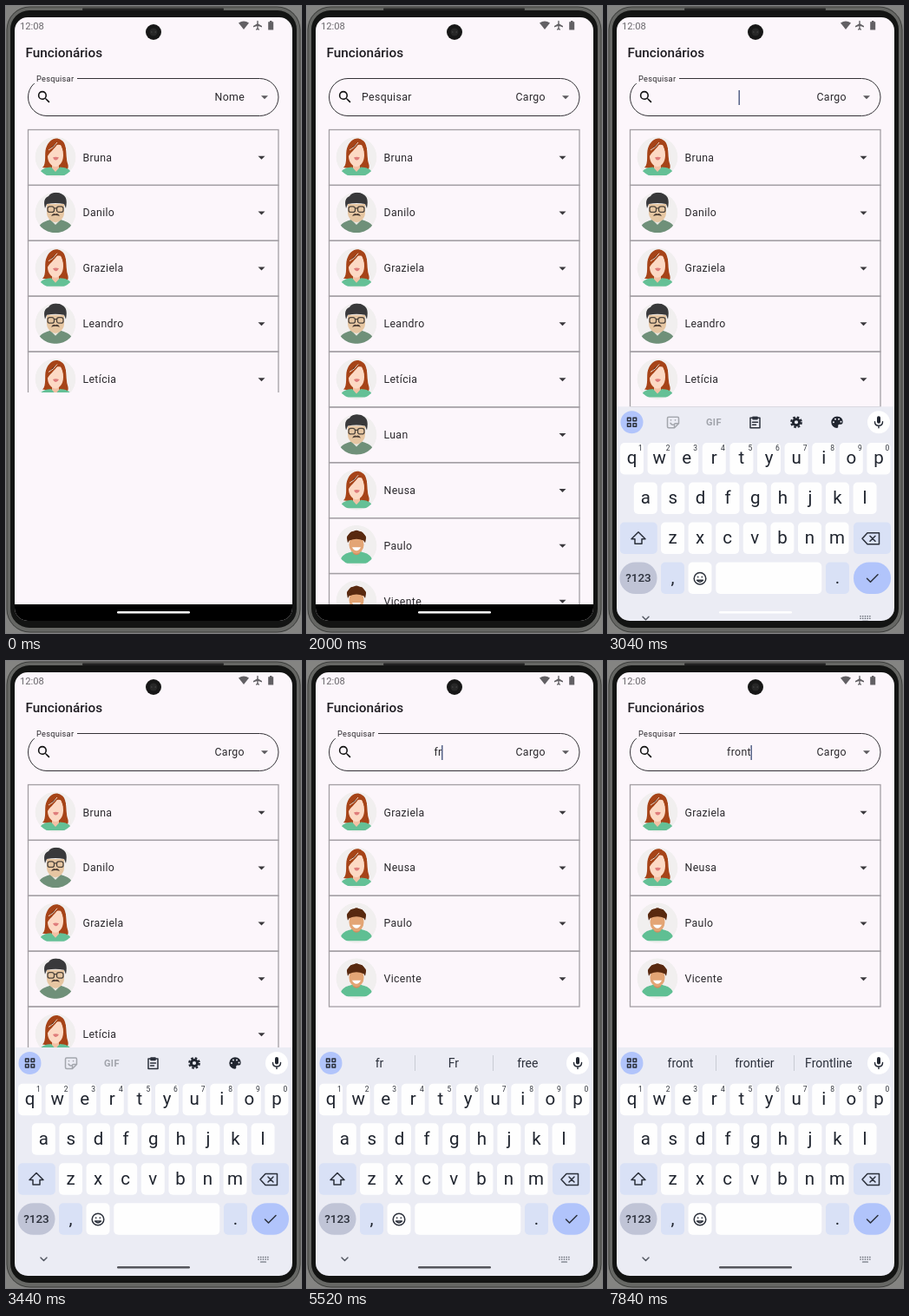
Recreate the animation shown at these times as an HTML page. Size 340 px wide and 722 px high, loop 8 s.

```html
<!DOCTYPE html>
<html lang="pt">
<head>
<meta charset="utf-8">
<title>Lista de funcionários</title>
<style>
html, body { margin: 0; width: 100%; height: 100%; overflow: hidden; background: #848482; }
svg { display: block; width: 340px; height: 722px; font-family: Roboto, "Noto Sans", sans-serif; }
.body { font-size: 12.3px; letter-spacing: .36px; fill: #2a282c; }
.mid { text-anchor: middle; }
.key { font-size: 20.5px; fill: #20252f; }
.hint { font-size: 8.5px; fill: #30343d; }
.line { fill: none; stroke: #2b303b; stroke-width: 1.5; stroke-linecap: round; stroke-linejoin: round; }
.label, .gap, .menu, .items, .board, .pill, .caret {
  animation: 8s linear infinite;
}
.label { animation-name: label; }
.gap { animation-name: gap; transform-origin: 57px 0; }
.menu { animation-name: menu; transform-origin: 326px 80px; }
.items { animation-name: items; }
.board { animation-name: board; }
.pill { animation-name: pill; }
.caret { animation-name: blink; animation-timing-function: step-end; }
@keyframes label {
  0%, 2%, 34.5%, 100% { transform: translate(35px, 87px) scale(.75); animation-timing-function: ease-in-out; }
  5%, 32% { transform: translate(63px, 109px) scale(1); animation-timing-function: ease-in-out; }
}
@keyframes gap {
  0%, 2%, 34.5%, 100% { transform: scaleX(1); }
  5%, 32% { transform: scaleX(0); }
}
@keyframes menu {
  0%, 6% { opacity: 0; transform: scale(.4, .1); animation-timing-function: ease-out; }
  7.5% { opacity: 1; }
  10.5%, 18.5% { opacity: 1; transform: none; }
  22.5%, 100% { opacity: 0; transform: none; }
}
@keyframes items {
  0%, 7.5% { opacity: 0; }
  11%, 100% { opacity: 1; }
}
@keyframes board {
  0%, 33% { transform: translateY(265px); animation-timing-function: cubic-bezier(.165, .84, .44, 1); }
  42%, 100% { transform: none; }
}
@keyframes pill {
  0%, 41% { fill: #fff; }
  43%, 100% { fill: #55565c; }
}
@keyframes blink {
  0% { opacity: 0; }
  33% { opacity: 1; }
  39.25% { opacity: 0; }
  45.5% { opacity: 1; }
  51.75% { opacity: 0; }
  56% { opacity: 1; }
  62.25% { opacity: 0; }
  66% { opacity: 1; }
  91.25% { opacity: 0; }
  97%, 100% { opacity: 1; }
}
</style>
</head>
<body>
<svg viewBox="0 0 340 722">
  <defs>
    <clipPath id="screen"><rect x="10" y="13" width="320" height="695" rx="15"/></clipPath>
    <clipPath id="disc"><circle r="23.5"/></clipPath>
    <filter id="shadow" x="-20%" y="-20%" width="140%" height="140%">
      <feDropShadow dx="0" dy="2" stdDeviation="3.6" flood-opacity=".42"/>
    </filter>

    <g id="woman" clip-path="url(#disc)">
      <circle r="23.5" fill="#f1efef"/>
      <path fill="#a64418" d="M-15 12C-10 8-13-4-11-10-8-20 0-24 6-20 13-17 12-6 13 2 13 7 16 9 14 14L8 13H-8z"/>
      <path fill="#f3c0a4" d="M-4 6H4V14L0 18-4 14z"/>
      <path fill="#64c096" d="M-19 21C-18 13-10 12-5 11.5L0 17 5 11.5C11 12 18 13 19 21z"/>
      <path fill="#fcd9c4" d="M-8-7Q-2-16 6-14 9-10 9-2C9 6 4 11 0 11-5 11-9 5-9-1z"/>
      <path fill="#a64418" d="M-10 1C-8-5-1-9 3-16L6-15C8-11 8-8 11-2L12-10 4-20-6-17-11-9z"/>
      <path stroke="#f6dccb" stroke-width="1" d="M-8-8Q-2-11 2-17"/>
      <path fill="#df7d7c" d="M-3 .5Q0-1 4 .5 2 4 0 3.5-2 3-3 .5z"/>
    </g>

    <g id="man" clip-path="url(#disc)">
      <circle r="23.5" fill="#f1efef"/>
      <path fill="#6f9079" d="M-21 23C-20 11-11 10-6 8H6C11 10 20 11 21 23z"/>
      <path fill="#e7e6df" d="M-6 8 0 14 6 8 5 5H-5z"/>
      <path fill="#e6c6a2" d="M-10-10H10V0C10 7 4 11 0 11S-10 7-10 0z"/>
      <path fill="#39393b" d="M-12-5C-14-12-13-17-8-19-5-24 4-24 8-21 14-18 13-11 12-5L10-10Q0-12-10-10z"/>
      <g fill="none" stroke="#4d443c" stroke-width="1.3">
        <rect x="-9" y="-7" width="7.5" height="6.5" rx="2.5"/>
        <rect x="1.5" y="-7" width="7.5" height="6.5" rx="2.5"/>
        <path d="M-1.5-5h3"/>
      </g>
      <path fill="#4a3c34" d="M-5 4Q-3 0 0 1.5 3 0 5 4 2 3 0 3-2 3-5 4z"/>
    </g>

    <g id="boy" clip-path="url(#disc)">
      <circle r="23.5" fill="#f1efef"/>
      <path fill="#5fbf93" d="M-19 20.5C-18 9-10 9-5 7H5C10 9 18 9 19 20.5z"/>
      <path fill="#cf8d5f" d="M-4 4H4V9Q0 13-4 9z"/>
      <ellipse cy="-1" rx="8.5" ry="10.5" fill="#e3a575"/>
      <g fill="#58290f">
        <path d="M-10-3C-13-12-7-17 0-17S13-12 10-3L8-6Q0-9-8-6z"/>
        <circle cx="-8" cy="-9" r="3"/><circle cx="-4.500" cy="-13" r="3"/>
        <circle cy="-14.500" r="3"/><circle cx="4.500" cy="-13" r="3"/><circle cx="8" cy="-9" r="3"/>
      </g>
      <path fill="#fff" d="M-5 2H5Q3 6 0 6-3 6-5 2z"/>
    </g>
  </defs>

  <rect width="340" height="722" fill="#848482"/>
  <rect x=".5" y=".5" width="339" height="721" rx="27" fill="#3c3d3b"/>
  <rect x="1.500" y="1.500" width="337" height="719" rx="26" fill="#666764"/>
  <rect x="5" y="5" width="330" height="711" rx="22" fill="#131413"/>
  <rect x="88" y="2.500" width="163" height="2.500" rx="1" fill="#222"/>

  <g clip-path="url(#screen)">
    <rect width="340" height="722" fill="#fcf6fb"/>
    <text x="16" y="27" font-size="11.2" fill="#6b696d">12:08</text>
    <g fill="#626064">
      <path d="M268 19.500Q274 15.500 280 19.500L274 27z"/>
      <path d="M289.300 17.500q.7-1.500 1.400 0v3l4.300 2.500v1.400l-4.300-1.300v2.700l1.300 1v1l-2-.6-2 .6v-1l1.300-1v-2.700l-4.300 1.300v-1.400l4.300-2.500z"/>
      <path d="M304 17h2.500v1.200h1.700v9.300h-6v-9.300h1.800z"/>
    </g>
    <text x="22.500" y="59.400" font-size="15.300" font-weight="500" fill="#1d1b20">Funcionários</text>

    <rect x="25.500" y="83.500" width="288.500" height="43" rx="21.500" fill="none" stroke="#333136"/>
    <rect class="gap" x="32" y="82" width="50" height="7" fill="#fcf6fb"/>
    <text class="body label">Pesquisar</text>
    <path transform="translate(34.500 95.500) scale(.78)" fill="#111" d="M15.500 14h-.79l-.28-.27A6.470 6.470 0 0 0 16 9.500 6.500 6.500 0 1 0 9.500 16c1.610 0 3.090-.59 4.230-1.570l.27.28v.79l5 4.990L20.490 19zm-6 0a4.500 4.500 0 1 1 0-9 4.500 4.500 0 0 1 0 9z"/>
    <text id="byName" class="body" x="240.500" y="109">Nome</text>
    <text id="byRole" class="body" x="240.500" y="109">Cargo</text>
    <path d="M294 103.200h8l-4 4z" fill="#5b595d"/>
    <g id="typed"></g>

    <g id="all"></g>
    <g id="found"></g>
    <rect id="mask" x="10" y="445" width="320" height="244" fill="#fcf6fb"/>
    <rect x="10" y="689" width="320" height="20" fill="#000"/>

    <g class="board">
      <rect x="10" y="445" width="320" height="270" fill="#ebecf4"/>
      <g id="tools">
        <g class="line" style="stroke:#a3a6ad">
          <path d="M70 457h10q1.500 0 1.500 1.500v6l-5 5H70q-1.500 0-1.500-1.500v-9.500q0-1.500 1.500-1.500zM76.500 469v-3.500q0-1 1-1h3.500M72 464q2 3 4 1.500M72.500 460.500v.3M77.500 460.500v.3"/>
        </g>
        <text class="mid" x="122" y="467" font-size="11" font-weight="700" letter-spacing=".5" fill="#a0a3aa">GIF</text>
        <path class="line" d="M164 458h11v11.500h-11zM167 457h5v2.500h-5zM166.500 463h6M166.500 466h4"/>
        <circle cx="217" cy="463" r="3.600" fill="none" stroke="#20252f" stroke-width="3"/>
        <circle cx="217" cy="463" r="5.800" fill="none" stroke="#20252f" stroke-width="2.200" stroke-dasharray="2.600 1.960"/>
        <path fill="#20252f" d="M264 456.300a6.700 6.700 0 1 0 0 13.400q1.800-.3 1.200-2.200-.3-2 1.500-2h2q2-.3 2-3-.5-6-6.700-6.200z"/>
        <g fill="#ebecf4"><circle cx="260" cy="463" r="1"/><circle cx="262" cy="459.500" r="1"/><circle cx="266" cy="459.500" r="1"/><circle cx="268.500" cy="462.500" r="1"/></g>
      </g>
      <g id="hints"><path d="M124.500 454v18M214.500 454v18" stroke="#c9ccd4"/></g>
      <circle cx="27.500" cy="463" r="13" fill="#b1c4fb"/>
      <path class="line" d="M22.500 458h3.600v3.600h-3.600zM29 458h3.600v3.600H29zM22.500 464.500h3.600v3.600h-3.600zM29 464.500h3.600v3.600H29z"/>
      <circle cx="312" cy="463" r="13" fill="#fff"/>
      <rect x="310" y="456" width="4" height="8.500" rx="2" fill="#20252f"/>
      <path class="line" d="M307.500 462.500q0 4.500 4.500 4.500t4.500-4.500M312 467v2.500"/>
      <g id="keys"></g>
      <g class="line">
        <path d="M35 589.500l-8 8h4v5.500h8v-5.500h4z"/>
        <path d="M299 590.500h13.500v13H299l-6-6.500zM302 594l6 6M308 594l-6 6"/>
        <circle cx="106" cy="643" r="6.800"/>
        <path d="M103.700 641v.4M108.300 641v.4M102.500 645q3.500 3.800 7 0z"/>
        <path d="M298.500 643l4 4 8.500-8.500"/>
        <path d="M40 687l3.500 3.500 3.500-3.500" style="stroke:#555a64"/>
        <path d="M291 686.500h11M291 689h11" style="stroke:#555a64;stroke-dasharray:.1 2.600"/>
        <path d="M293.500 692h6" style="stroke:#555a64;stroke-width:1.200"/>
      </g>
    </g>
    <rect class="pill" x="128" y="697" width="84" height="2.600" rx="1.300"/>

    <g class="menu">
      <rect x="228" y="80" width="98" height="125" rx="3" fill="#fcf6fb" filter="url(#shadow)"/>
      <g class="items body">
        <text x="240.500" y="109">Nome</text>
        <text x="240.500" y="146.500">Cargo</text>
        <text x="240.500" y="184">Telefone</text>
      </g>
    </g>
  </g>

  <circle cx="170" cy="30" r="9" fill="#171717"/>
  <circle cx="170" cy="30" r="4.500" fill="#272727"/>
  <path d="M167 30h1.500M171.500 30h1.500" stroke="#4a4a4a"/>
</svg>
<script>
const LOOP = 8000;
const $ = id => document.getElementById(id);

// Visible from one time to another within the loop.
function show(el, from, to) {
  const frame = (opacity, ms) => ({ opacity, offset: ms / LOOP, easing: 'step-end' });
  const frames = [frame(1, from)];
  if (from > 0) frames.unshift(frame(0, 0));
  if (to < LOOP) frames.push(frame(0, to));
  frames.push(frame(to < LOOP ? 0 : 1, LOOP));
  el.animate(frames, { duration: LOOP, iterations: Infinity });
}

const people = [
  ['Bruna', 'woman'], ['Danilo', 'man'], ['Graziela', 'woman'],
  ['Leandro', 'man'], ['Letícia', 'woman'], ['Luan', 'man'],
  ['Neusa', 'woman'], ['Paulo', 'boy'], ['Vicente', 'boy']
];

function list(rows) {
  const pitch = 63.88;
  return rows.map(([name, face], i) => `
    <g transform="translate(0 ${142.5 + i * pitch})">
      <rect x="25.500" width="288.500" height="${pitch}" fill="none" stroke="#a39fa4" stroke-width="1.300"/>
      <use href="#${face}" x="57" y="31.500"/>
      <text class="body" x="88.500" y="36">${name}</text>
      <path d="M290.500 30.200h8l-4 4z" fill="#3a383c"/>
    </g>`).join('');
}
$('all').innerHTML = list(people);
$('found').innerHTML = list([2, 6, 7, 8].map(i => people[i]));

function key(x, y, w, fill, label = '', rx = 5) {
  return `<rect x="${x - w / 2}" y="${y - 18.3}" width="${w}" height="36.600" rx="${rx}" fill="${fill}"/>
    <text class="key mid" x="${x}" y="${y + 6}">${label}</text>`;
}
const step = 31.6, soft = '#d9e1f6', white = '#fefefe';
const rows = [['qwertyuiop', 27.5, 505], ['asdfghjkl', 43.3, 550.5], ['zxcvbnm', 74.5, 596.5]];
let keys = '';
for (const [letters, x, y] of rows)
  [...letters].forEach((c, i) => keys += key(x + i * step, y, 27, white, c));
for (let i = 0; i < 10; i++)
  keys += `<text class="hint mid" x="${37.5 + i * step}" y="496">${(i + 1) % 10}</text>`;
keys += key(35.3, 596.5, 43, soft) + key(304.5, 596.5, 43, soft)
  + key(35, 642.5, 43, '#c0c4d6', '', 18) + key(74.5, 642.5, 27, soft, ',')
  + key(106, 642.5, 27, white) + key(185.3, 642.5, 122, white)
  + key(264.5, 642.5, 27, soft, '.') + key(304.5, 642.5, 43, '#b1c4fb', '', 18)
  + '<text class="mid" x="35" y="647" font-size="13.500" font-weight="500" fill="#2b303b">?123</text>';
$('keys').innerHTML = keys;

// Start time, typed text, suggestions
const typing = [
  [2640, '', []],
  [4480, 'f', ['f', 'F', 'for']],
  [5280, 'fr', ['fr', 'Fr', 'free']],
  [5760, 'fro', ['fro', 'from', 'front']],
  [6240, 'fron', ['fron', 'front', 'frontier']],
  [6800, 'front', ['front', 'frontier', 'Frontline']]
];
function group(parent, html) {
  const g = document.createElementNS('http://www.w3.org/2000/svg', 'g');
  g.innerHTML = html;
  return parent.appendChild(g);
}
typing.forEach(([from, word, tips], i) => {
  const to = i + 1 < typing.length ? typing[i + 1][0] : LOOP;
  const field = group($('typed'), `<text class="body mid" x="151" y="109">${word}</text>
    <rect class="caret" y="97" width="1.400" height="17" fill="#48577f"/>`);
  const width = field.querySelector('text').getComputedTextLength();
  field.querySelector('rect').setAttribute('x', 150.5 + width / 2);
  show(field, from, to);
  show(group($('hints'), tips.map((tip, n) =>
    `<text class="mid" x="${83.5 + n * 85.4}" y="468" font-size="14" fill="#2b303b">${tip}</text>`).join('')), from, to);
});

show($('byName'), 0, 1440);
show($('byRole'), 1440, LOOP);
show($('mask'), 0, 240);
show($('all'), 0, 5280);
show($('found'), 5280, LOOP);
show($('tools'), 0, 4480);
show($('hints'), 4480, LOOP);
</script>
</body>
</html>
```
